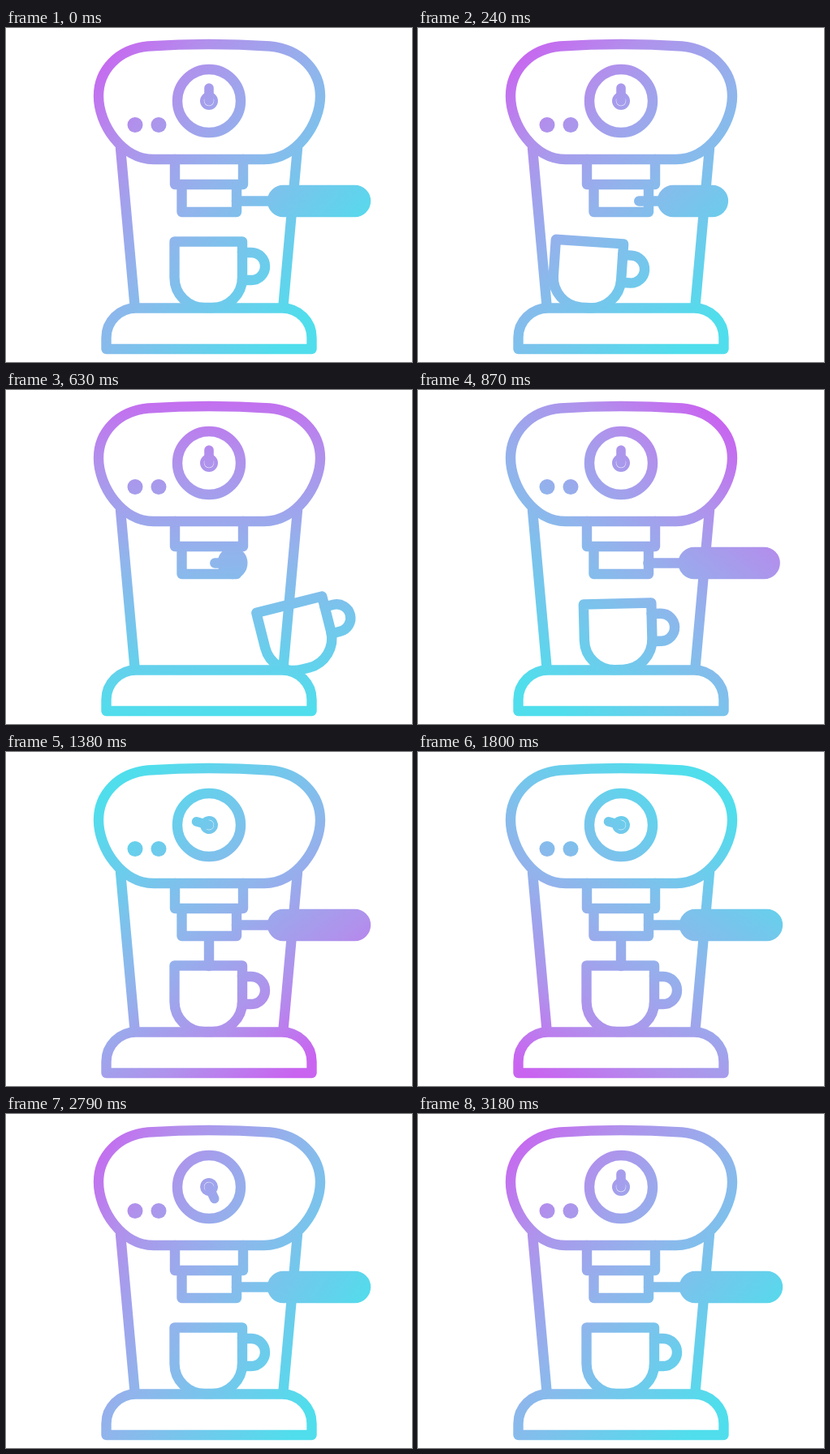
Write an HTML page that moves like this. It is 500 px wide and 412 px high and loops after 3270 ms.

```html
<!DOCTYPE html>
<html lang="en">
<head>
<meta charset="utf-8">
<title>Espresso machine</title>
<style>
  html, body { margin: 0; width: 100%; height: 100%; overflow: hidden; background: #fff; }
  svg { display: block; width: 100%; height: 100%; }
  .ink { fill: none; stroke: #fff; stroke-width: 12.4; stroke-linecap: round; stroke-linejoin: round; }
  .solid { fill: #fff; }
  #needle circle { stroke-width: 4.8; }
  #needle path { stroke-width: 11.6; }
</style>
</head>
<body>
<svg viewBox="0 0 500 412">
  <defs>
    <linearGradient id="tint" gradientUnits="userSpaceOnUse">
      <stop offset="0.05" stop-color="#c964f0"/>
      <stop offset="0.24" stop-color="#b190ec"/>
      <stop offset="0.5" stop-color="#90b5ec"/>
      <stop offset="0.9" stop-color="#50deec"/>
    </linearGradient>
    <mask id="machine" maskUnits="userSpaceOnUse" x="0" y="0" width="500" height="412">
      <g class="ink">
        <!-- body -->
        <path d="M175 22.5Q250 17.5 325 22.5C362 26 387 52 387 84C387 118 358 162 318 162H182C142 162 114 118 114 84C114 52 138 26 175 22.5Z"/>
        <path d="M141 148L158.5 342M359 148L341.5 342"/>
        <path d="M123.5 396V382A36.5 36.5 0 0 1 160 345.5H340A36.5 36.5 0 0 1 376.5 382V396Z"/>
        <path d="M208 162V193H292V162M216.5 193V227H284V193"/>
        <!-- dial -->
        <circle cx="250" cy="90" r="39"/>
        <g id="needle">
          <circle cx="250" cy="90" r="8.6"/>
          <path d="M250 90V74"/>
        </g>
        <!-- portafilter handle -->
        <path id="rod"/>
        <rect id="grip" class="solid" y="200" height="27" rx="13.5"/>
        <path id="stream"/>
        <g id="mug">
          <path d="M207.5 263.5H291V308A37 37 0 0 1 254 345H244.5A37 37 0 0 1 207.5 308Z"/>
          <path d="M291 277H302A17 17 0 0 1 302 311H291"/>
        </g>
      </g>
      <g class="solid">
        <circle cx="159" cy="119.5" r="9.5"/>
        <circle cx="188" cy="119.5" r="9.5"/>
      </g>
    </mask>
  </defs>
  <rect width="500" height="412" fill="url(#tint)" mask="url(#machine)"/>
</svg>
<script>
const LOOP = 3270;
const [tint, needle, rod, grip, stream, mug] =
  ['tint', 'needle', 'rod', 'grip', 'stream', 'mug'].map(id => document.getElementById(id));

const set = (el, attrs) => {
  for (const name in attrs) el.setAttribute(name, attrs[name]);
};
const progress = (t, from, to) => Math.min(1, Math.max(0, (t - from) / (to - from)));
const smooth = p => p * p * (3 - 2 * p);
const ramp = (t, from, to) => smooth(progress(t, from, to));

// Cubic Bezier easing with control points (x1, 0) and (x2, 1).
function bezierEase(p, x1, x2) {
  let low = 0, high = 1;
  for (let i = 0; i < 24; i++) {
    const s = (low + high) / 2, r = 1 - s;
    if (3 * r * r * s * x1 + 3 * r * s * s * x2 + s ** 3 < p) low = s;
    else high = s;
  }
  return smooth(low);
}

function drawTint(t) {
  const angle = (41 + 360 * bezierEase(t / LOOP, 0.32, 0.43)) * Math.PI / 180;
  const dx = 240 * Math.cos(angle), dy = 240 * Math.sin(angle);
  set(tint, { x1: 245 - dx, y1: 208 - dy, x2: 245 + dx, y2: 208 + dy });
}

function drawHandle(t) {
  const k = 1 - 0.935 * (ramp(t, 30, 540) - ramp(t, 540, 900));
  const x = offset => 250 + offset * k;
  set(rod, { d: `M${x(34)} 213.5H${x(78)}` });
  set(grip, { x: x(78), width: 115 * k });
}

// The mug leaves on the left and a fresh one slides in from the right.
function drawMug(t) {
  let shift, tilt;
  if (t < 480) {
    const p = (t / 480) ** 3;
    shift = -320 * p;
    tilt = 30.5 * p;
  } else {
    const p = progress(t, 480, 840);
    const settle = ramp(t, 840, 990);
    shift = 328 * (1 - p) ** 2 - 3 * smooth(p) * (1 - settle);
    tilt = -14 * Math.sin(Math.PI * p) - 1.6 * smooth(p) * (1 - settle);
  }
  set(mug, { transform: `translate(${shift} 0) rotate(${tilt} 249 304)` });
}

function drawNeedle(t) {
  const turn = 75 * ramp(t, 1080, 1350) + 105 * ramp(t, 2040, 2340) + 180 * ramp(t, 2700, 3090);
  set(needle, { transform: `rotate(${-turn} 250 90)` });
}

function drawStream(t) {
  const top = 230 + 34 * progress(t, 2160, 2430);
  const bottom = 230 + 34 * progress(t, 1170, 1350);
  set(stream, { d: bottom > top ? `M250 ${top}V${bottom}` : '' });
}

function render(t) {
  drawTint(t);
  drawHandle(t);
  drawMug(t);
  drawNeedle(t);
  drawStream(t);
}

const start = performance.now();
function tick() {
  render((performance.now() - start) % LOOP);
  requestAnimationFrame(tick);
}
render(0);
requestAnimationFrame(tick);
</script>
</body>
</html>
```
